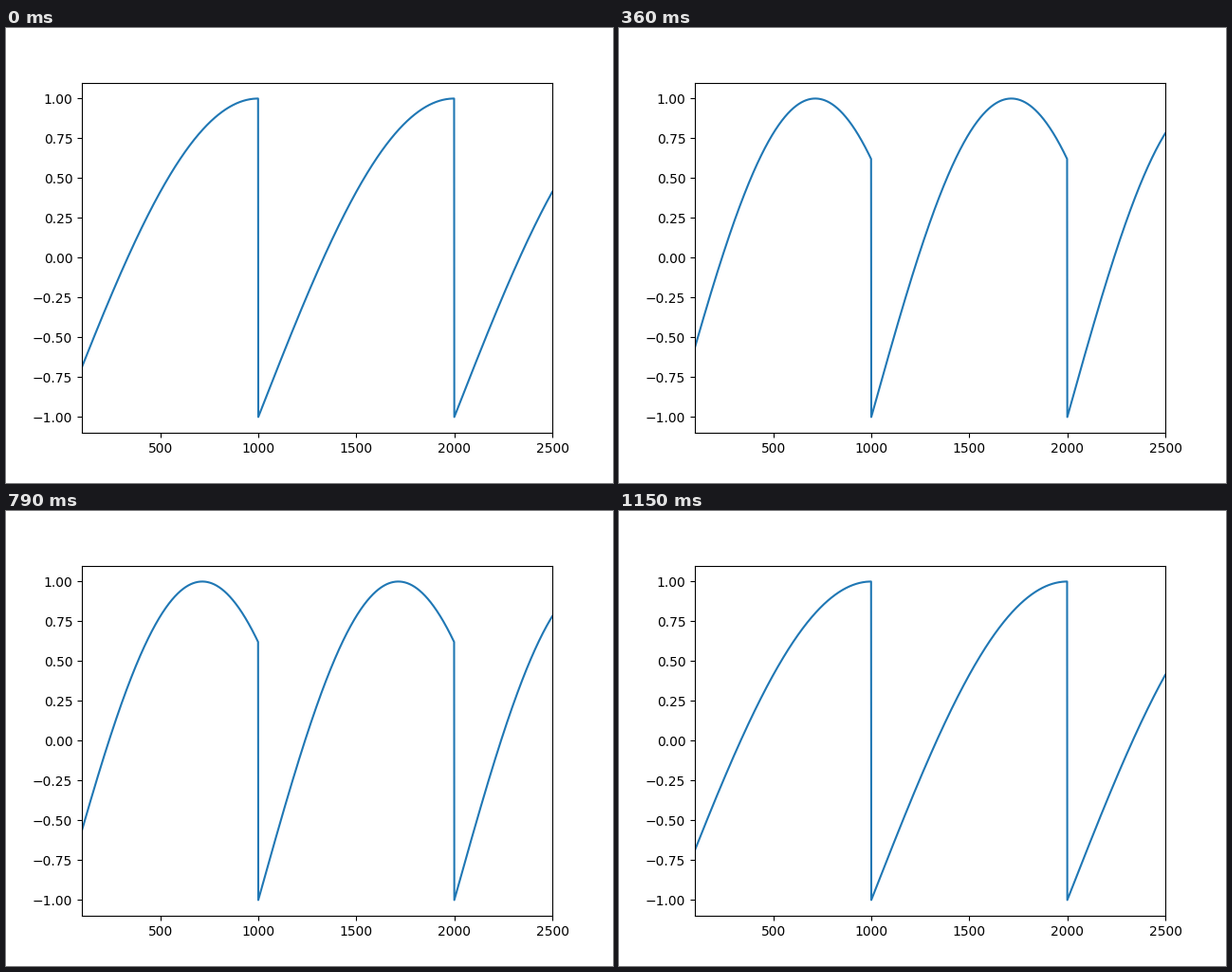
A matplotlib script for the animation above (1210 ms loop, 640 by 480 pixels).

```python
import numpy as np
import matplotlib.pyplot as plt
from matplotlib.animation import FuncAnimation

TICK = 10         # ms per frame
LOOP = 1210       # ms per loop
STEP = 60         # ms each curve is held
TURN = 670        # ms at which the sweep runs back
LAST = 9          # highest sweep step

fig, ax = plt.subplots(figsize=(6.4, 4.8), dpi=100)
x = np.arange(100, 2501)
phase = (x % 1000) / 1000


def wave(k):
    """Sine arc repeated every 1000 units, stretched by sweep step k."""
    return 2 * np.sin(np.pi / 2 * (1 + k / 15) * phase) - 1


def sweep_step(t):
    if t < TURN:
        return min(LAST, t // STEP)
    return max(0, LAST - 1 - (t - TURN) // STEP)


line, = ax.plot(x, wave(0))
ax.set_xlim(100, 2500)
ax.set_ylim(-1.1, 1.1)


def update(i):
    line.set_ydata(wave(sweep_step(i * TICK)))
    return line,


anim = FuncAnimation(fig, update, frames=LOOP // TICK, interval=TICK,
                     repeat=True, repeat_delay=0)
plt.show()
```
